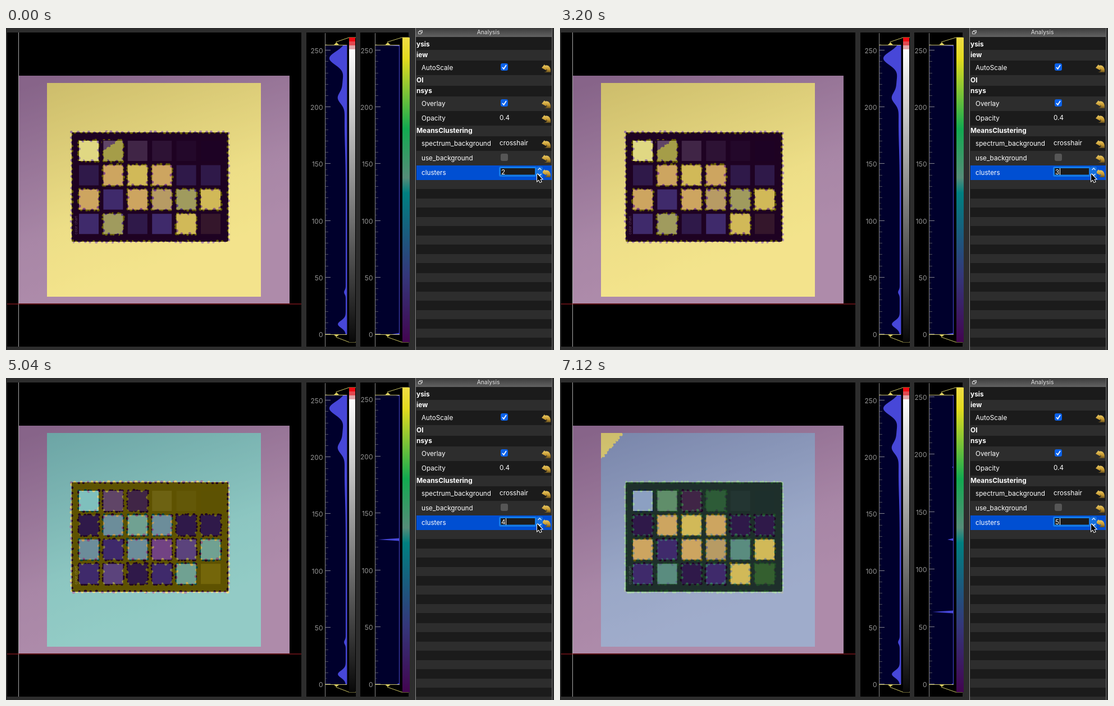
Animation of 976x574 px, one loop 7.2 s. Source, as an HTML page with a canvas:

```html
<!DOCTYPE html>
<html lang="en">
<head>
<meta charset="utf-8">
<title>Cluster analysis</title>
<style>
html, body { margin: 0; width: 976px; height: 574px; overflow: hidden; background: #2d2d2d; }
canvas { display: block; }
</style>
</head>
<body>
<canvas id="stage" width="976" height="574"></canvas>
<script>
const LOOP = 7200;
const BLINK = 530;
const FONT = 'Inter, "Open Sans", sans-serif';
const DARK = '#1b1b1b', LIGHT = '#2d2d2d', BLUE = '#4747d8';
const stage = document.getElementById('stage').getContext('2d');

// Value of the spin box over time, and when each clustering result appears.
const typing = [[-600, '2'], [960, ''], [2720, '3'], [4000, ''], [4640, '4'], [5920, ''], [6640, '5']];
const results = [[0, 0], [3360, 1], [5280, 2], [7040, 3]];

// A patch gets labels[n], where n counts the brightness limits it exceeds.
const clusterings = [
  { colors: ['#440154', '#f0dc08'], card: 0, paper: 1, limits: [104], labels: '01', rim: '01' },
  { colors: ['#440154', '#00a098', '#e3c800'], card: 2, paper: 1,
    limits: [42, 134], labels: '201', alt: '0', rim: '0202' },
  { colors: ['#440154', '#1e7aaa', '#009c5c', '#f0dc08'], card: 2, paper: 1,
    limits: [42, 104, 200], labels: '2031', alt: '0', rim: '3202', corner: [49, 57] },
  { colors: ['#440154', '#2052a5', '#447069', '#43b65c', '#f0dc08'], card: 2, paper: 1,
    limits: [22, 42, 104, 130, 200], labels: '230341', alt: '3', rim: '3332', corner: [38, 46] }
];

// Colour chart: a gray ramp, then three rows of tones.
const tones = {
  navy: [34, 42, 66], blue: [60, 70, 123], slate: [107, 112, 152], mauve: [145, 112, 163],
  rose: [182, 129, 156], sand: [189, 162, 142], brown: [42, 37, 17]
};
const { navy, blue, slate, mauve, rose, sand, brown } = tones;
const patches = [
  ...Array.from({ length: 6 }, (_, i) => Array(3).fill(222 * .56 ** i - 8)),
  navy, rose, sand, rose, navy, navy,
  rose, blue, rose, mauve, slate, sand,
  blue, slate, navy, blue, sand, brown
].map((rgb, i) => ({ rgb, box: [130 + (i % 6) * 43.4, 201 + Math.floor(i / 6) * 43.4, 35, 36] }));
const PAPER = [73, 98, 381, 381];
const CARD = [117, 186, 279, 195];
const IMAGE = [23, 85, 482, 406];

function randomizer(seed) {
  return () => (seed = (seed * 16807) % 2147483647) / 2147483647;
}

function rect(g, color, x, y, w, h, radius = 0) {
  g.fillStyle = color;
  g.beginPath();
  g.roundRect(x, y, w, h, radius);
  g.fill();
}

function trace(g, points) {
  g.beginPath();
  points.forEach(([x, y]) => g.lineTo(x, y));
}

function poly(g, color, points) {
  trace(g, points);
  g.fillStyle = color;
  g.fill();
}

function line(g, color, points, width = 1) {
  trace(g, points);
  g.strokeStyle = color;
  g.lineWidth = width;
  g.stroke();
}

function text(g, str, x, y, { size = 11.7, color = '#fff', weight = 400, align = 'left' } = {}) {
  g.font = `${weight} ${size}px ${FONT}`;
  g.textAlign = align;
  g.fillStyle = color;
  g.fillText(str, x, y);
}

function gradient(g, x0, y0, x1, y1, stops) {
  const fill = g.createLinearGradient(x0, y0, x1, y1);
  stops.forEach(([at, color]) => fill.addColorStop(at, color));
  return fill;
}

function layer() {
  const canvas = document.createElement('canvas');
  canvas.width = 976;
  canvas.height = 574;
  return canvas.getContext('2d');
}

const outline = ([x, y, w, h]) => [[x, y], [x + w, y], [x + w, y + h], [x, y + h], [x, y]];

function drawPhoto(g) {
  rect(g, gradient(g, 100, 85, 220, 440, [[0, '#b5a8ae'], [.7, '#ece1de'], [1, '#f6e9e5']]), ...IMAGE);
  rect(g, '#060402', ...CARD, 2);
  patches.forEach(({ rgb, box }) => rect(g, `rgb(${rgb})`, ...box));
  g.save();
  g.translate(127, 368);
  g.rotate(-Math.PI / 2);
  text(g, 'color chart', 0, 0, { size: 6.5, color: '#66666a' });
  g.restore();
}

// Small label islands strung along a path, taking the colours in turn.
function speckle(g, points, colors, random, step = 5) {
  let n = 0;
  points.slice(1).forEach(([x1, y1], i) => {
    const [x0, y0] = points[i];
    const count = Math.round(Math.hypot(x1 - x0, y1 - y0) / step);
    for (let k = 0; k < count; k++) {
      const f = (k + random() * .4) / count;
      g.fillStyle = colors[n++ % colors.length];
      g.beginPath();
      g.arc(x0 + (x1 - x0) * f + random() * 2 - 1, y0 + (y1 - y0) * f + random() * 2 - 1, 2 + random() * .8, 0, 7);
      g.fill();
    }
  });
}

function corner(g, color, x, y, w, h, random) {
  poly(g, color, [[x, y], [x + w, y], [x, y + h]]);
  speckle(g, [[x + w - 2, y + 3], [x + 2, y + h - 3]], [color], random, 6);
}

function labelOf({ rgb: [r, g, b] }, { limits, labels }) {
  const tone = .6 * g + .4 * b;   // luminance, raised for bluish tones
  return +labels[limits.filter(limit => tone > limit).length];
}

function drawLabels(g, clustering, seed) {
  const { colors, card, paper, alt = '', rim, corner: size } = clustering;
  const pick = list => [...list].map(n => colors[n]);
  const random = randomizer(seed);
  rect(g, colors[0], ...IMAGE);
  rect(g, colors[paper], ...PAPER);
  if (size) corner(g, colors[colors.length - 1], PAPER[0], PAPER[1], ...size, random);
  rect(g, colors[card], ...CARD);
  speckle(g, outline(CARD), pick(rim), random);
  patches.forEach((patch, i) => {
    const label = labelOf(patch, clustering);
    if (label === card) return;
    rect(g, colors[label], ...patch.box);
    speckle(g, outline(patch.box), pick(`${label}${card}${label}${alt}`), random);
    if (i === 1 && paper === colors.length - 1) corner(g, colors[0], 171, 200, 26, 20, random);
  });
}

// Length of each histogram spike, from the area that carries its label.
function spikes(clustering) {
  const { colors, card, paper } = clustering;
  const area = ([, , w, h]) => w * h;
  const areas = colors.map(() => 0);
  areas[paper] = area(PAPER) - area(CARD);
  areas[card] += area(CARD);
  patches.forEach(patch => {
    areas[card] -= area(patch.box);
    areas[labelOf(patch, clustering)] += area(patch.box);
  });
  return areas.map(a => 38 * a / Math.max(...areas));
}

const images = clusterings.map((clustering, i) => {
  const photo = layer(), labels = layer();
  drawPhoto(photo);
  drawLabels(labels, clustering, 77 + i);
  photo.globalAlpha = .4;
  photo.drawImage(labels.canvas, 0, 0);
  return photo.canvas;
});

function drawHistogram(g, x, axis, right, max, drawCurve) {
  const yOf = v => 546 - v * 516 / max;
  const mid = (axis + right) / 2, bar = right + 4;
  rect(g, '#000', x, 8, bar + 12 - x, 560);
  rect(g, '#00002c', axis, 30, right - axis, 516);
  drawCurve(yOf);
  for (let v = 0; v <= max; v += 5) {
    const y = Math.round(yOf(v)) - .5;
    const [len, color] = v % 50 === 0 ? [10, '#83838b'] : v % 10 === 0 ? [6, '#4c4c58'] : [4, '#33333f'];
    line(g, color, [[axis, y], [axis + len, y]]);
    if (v % 50 === 0) text(g, v, axis - 3.5, y + 5, { size: 12, color: '#969696', align: 'right' });
  }
  line(g, '#8a8a8a', [[axis + .5, 9], [axis + .5, 568]]);
  [[30, -1, 17], [546, 1, 560]].forEach(([y, side, end]) => {
    line(g, '#c8c064', [[axis, y + .5], [right, y + .5]]);
    line(g, '#c8c064', [[mid, y + 5 * side], [bar, end], [bar + 12, end]]);
    poly(g, '#d8cc60', [[mid - 4, y + .5], [mid + 1, y + 4.5 * side], [mid + 6, y + .5]]);
  });
}

function drawGrayHistogram(g) {
  const bump = (y, center, width, height) => height * Math.exp(-(((y - center) / width) ** 2));
  const widthAt = y => 2.5 + bump(y, 54, 17, 29) + bump(y, 98, 22, 5) + bump(y, 125, 14, 12) +
    bump(y, 170, 60, 2) + bump(y, 471, 5, 3) + bump(y, 528, 9, 14);
  const profile = [[607.5, 30]];
  for (let y = 30; y <= 546; y += 2) profile.push([607.5 - widthAt(y), y]);
  drawHistogram(g, 535, 568, 607, 255, () => poly(g, BLUE, [...profile, [607.5, 546]]));
  rect(g, gradient(g, 0, 34, 0, 560, [[0, '#fff'], [.5, '#858585'], [1, '#080808']]), 611, 17, 11, 543);
  ['#f00b12', '#e2484f', '#e0a5a8'].forEach((color, i) => rect(g, color, 611, 17 + i * 7, 11, 7));
}

function drawLabelHistogram(g, clustering) {
  const lengths = spikes(clustering);
  const step = Math.floor(255 / (lengths.length - 1));
  drawHistogram(g, 631, 657, 701, step * (lengths.length - 1), yOf => {
    g.save();
    g.beginPath();
    g.rect(657, 30, 44, 516);
    g.clip();
    lengths.forEach((len, i) => {
      const y = yOf(i * step);
      poly(g, BLUE, [[701, y - 2.5], [701 - len, y], [701, y + 2.5]]);
    });
    line(g, BLUE, [[700.5, 30], [700.5, 546]]);
    g.restore();
  });
  rect(g, gradient(g, 0, 17, 0, 560, [[0, '#efdc44'], [.07, '#e2da1e'], [.3, '#12aa50'],
    [.46, '#568c78'], [.51, '#008080'], [.78, '#34377a'], [1, '#420550']]), 706, 17, 13, 543);
}

function drawCheckbox(g, y, checked) {
  rect(g, checked ? '#0b62ea' : '#565656', 881, y, 13, 13, 3);
  if (checked) line(g, '#fff', [[884, y + 7], [886.5, y + 10], [891, y + 3]], 1.8);
}

function drawUndo(g, y) {
  g.save();
  g.translate(962, y);
  g.beginPath();
  g.moveTo(-8, -1);
  g.lineTo(-3, -7);
  g.lineTo(-2, -5);
  g.bezierCurveTo(4, -7, 9, -2, 8, 7);
  g.lineTo(-4, 7);
  g.bezierCurveTo(2, 6, 3, 2, 0, 1);
  g.lineTo(1, 4);
  g.closePath();
  g.fillStyle = gradient(g, 0, -6, 0, 7, [[0, '#ecca62'], [.6, '#c2952e'], [1, '#66501f']]);
  g.fill();
  g.restore();
}

function drawSpinBox(g) {
  rect(g, '#147be8', 878, 247, 67, 18, 3);
  rect(g, '#1c1c1c', 881, 250, 61, 11.5);
  rect(g, '#176fdb', 945, 247, 11, 20, 3);
  [[253, 250], [260, 263]].forEach(([y, tip]) =>
    line(g, '#e4edff', [[947.5, y], [950.5, tip], [953.5, y]], 1.3));
}

// Settings tree; entries without a value are section headings.
const settings = [['ysis'], ['iew'], ['AutoScale', true], ['OI'], ['nsys'], ['Overlay', true], ['Opacity', '0.4'],
  ['MeansClustering'], ['spectrum_background', 'crosshair'], ['use_background', false], ['clusters', '']];

function drawPanel(g) {
  rect(g, DARK, 730, 0, 242, 568);
  rect(g, gradient(g, 0, 0, 0, 16, [[0, '#3c3c3c'], [1, '#626262']]), 730, 0, 242, 16);
  line(g, '#d5d5d5', outline([736.5, 4.5, 5, 4]));
  rect(g, '#484848', 734, 6, 5, 4);
  line(g, '#d5d5d5', outline([734.5, 6.5, 5, 4]));
  text(g, 'Analysis', 859, 11, { size: 10.3, color: '#e2e2e2', align: 'center' });

  let y = 20;
  settings.forEach(([label, value], i) => {
    const heading = value === undefined, height = heading ? 19 : 26;
    rect(g, label === 'clusters' ? '#004fd2' : i % 2 ? LIGHT : DARK, 731, y, 241, height);
    if (heading) {
      text(g, label, 731, y + 13, { size: 11.9, weight: 700 });
    } else {
      text(g, label, 740, y + 17);
      drawUndo(g, y + 14);
      if (typeof value === 'boolean') drawCheckbox(g, y + 5, value);
      else text(g, value, 879, y + 16);
    }
    y += height;
  });
  for (; y < 560; y += 33.1) rect(g, LIGHT, 731, Math.round(y), 241, 16);
  line(g, '#8b8b8b', [[729.5, 0], [729.5, 574]]);
  line(g, '#6a6a6a', [[972.5, 0], [972.5, 574]]);
  drawSpinBox(g);
}

function drawPointer(g) {
  const arrow = [[946, 260], [946, 273], [949, 270.3], [951.2, 275], [953.4, 274], [951.3, 269.5], [955, 269.2], [946, 260]];
  line(g, '#fff', arrow, 2);
  poly(g, '#000', arrow);
}

const backdrop = layer();
rect(backdrop, LIGHT, 0, 0, 976, 574);
rect(backdrop, '#000', 2, 8, 524, 560);
drawGrayHistogram(backdrop);
drawPanel(backdrop);

const current = (steps, t) => steps.filter(([start]) => start <= t).pop();

function draw(t) {
  const g = stage;
  const result = current(results, t)[1];
  const [start, value] = current(typing, t);
  g.drawImage(backdrop.canvas, 0, 0);
  g.drawImage(images[result], 0, 0);
  line(g, '#a8a8a8', [[22.5, 8], [22.5, 568]]);
  line(g, '#b02028', [[2, 492], [526, 492]]);
  drawLabelHistogram(g, clusterings[result]);
  text(g, value, 882, 260.5);
  if ((t - start) % (2 * BLINK) < BLINK) rect(g, '#fff', value ? 890 : 882, 250, 1, 12);
  drawPointer(g);
}

function frame() {
  draw(performance.now() % LOOP);
  requestAnimationFrame(frame);
}
frame();
</script>
</body>
</html>
```
